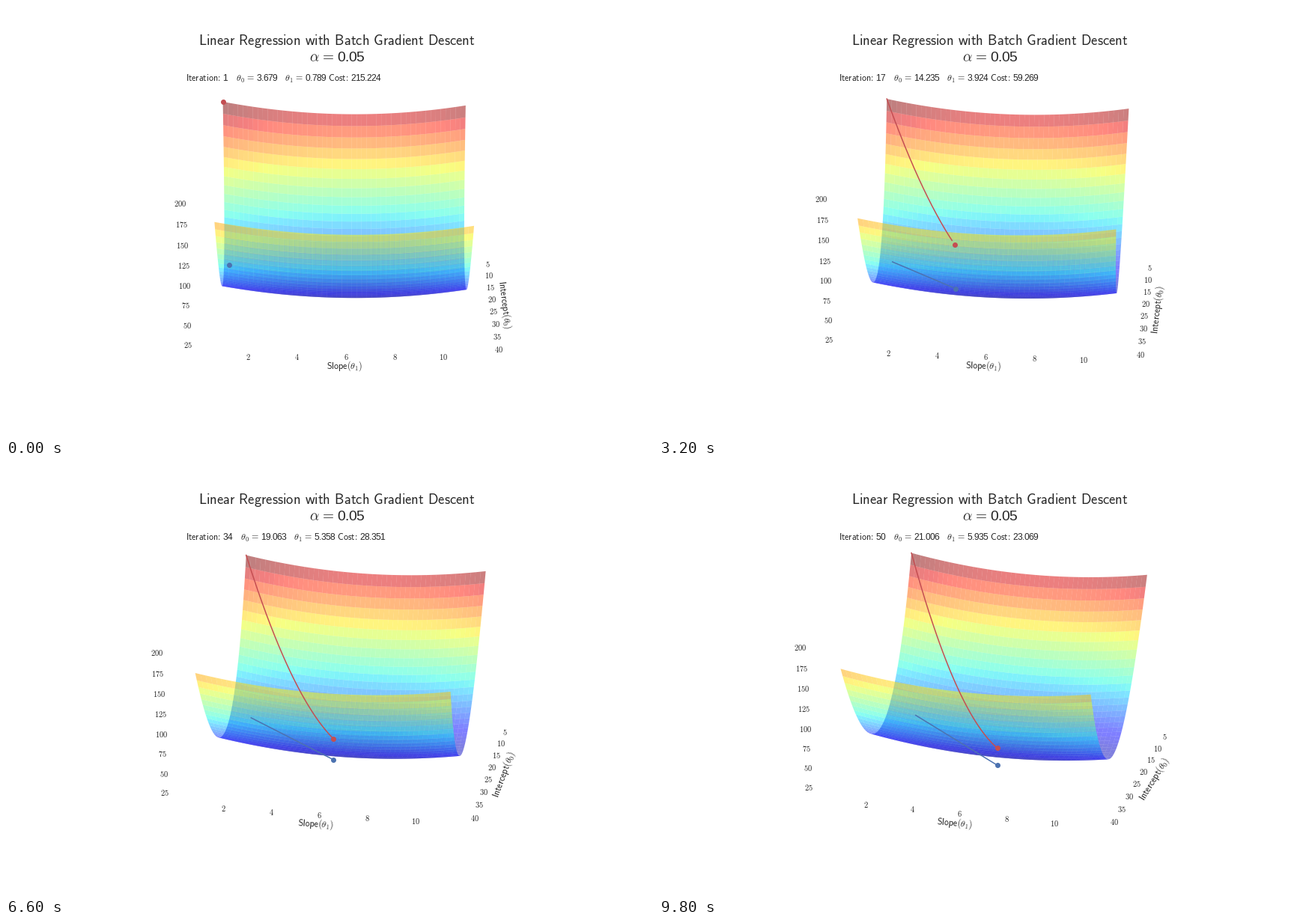
Write a matplotlib script that moves like this. It is 864x576 px and loops after 10000 ms.

```python
import numpy as np
import matplotlib.pyplot as plt
from matplotlib.animation import FuncAnimation
from matplotlib.collections import PolyCollection

plt.rcParams["mathtext.fontset"] = "cm"
plt.rcParams["font.family"] = "Liberation Sans"

W, H = 864, 576
STEPS = 50
INK, RED, BLUE = "#262626", "#C44E52", "#4C72B0"

# Gradient descent on a quadratic bowl, alpha = 0.05
BEST = np.array([22.5328, 6.389])
START = BEST - [19.8466, 5.8952]


def cost(t0, t1):
    return 21.8002 + ((t0 - BEST[0]) ** 2 + (t1 - BEST[1]) ** 2) / 2


decay = 0.95 ** np.arange(1, STEPS + 1)
T0, T1 = (b + (s - b) * decay for b, s in zip(BEST, START))
COST = cost(T0, T1)
END0, END1 = 38.42, 2 * T1[-1] - T1[0]

# Centre and length of each axis of the unit cube
MID = np.array([(T0[0] + END0) / 2, (T1[0] + END1) / 2, 114.9])
SPAN = np.array([1.1 * (END0 - T0[0]), 1.1 * (END1 - T1[0]), 198.9])

# Camera
ELEV, DIST, TURN = np.radians(30), 10, 0.3
CX, CY, KX, KY = 451.8, 284.9, 3619, 2397


def project(x, y, z, azim):
    """Cube coordinates to pixels and depth."""
    ca, sa = np.cos(azim), np.sin(azim)
    fwd, side = x * ca + y * sa, y * ca - x * sa
    depth = DIST - fwd * np.cos(ELEV) - z * np.sin(ELEV)
    up = z * np.cos(ELEV) - fwd * np.sin(ELEV)
    return CX + KX * side / depth, CY - KY * up / depth, depth


def place(t0, t1, z, azim):
    """Data coordinates to pixels and depth."""
    p = [(v - m) / s for v, m, s in zip((t0, t1, z), MID, SPAN)]
    return project(*p, azim)


def quads(a):
    return np.stack([a[:-1, :-1], a[:-1, 1:], a[1:, 1:], a[1:, :-1]], -1).reshape(-1, 4)


G0, G1 = np.meshgrid(np.linspace(T0[0], END0, 50),
                     np.linspace(T1[0], END1, 50), indexing="ij")
GZ = cost(G0, G1)
level = quads(GZ).mean(1)
FACES = plt.cm.jet((level - level.min()) / np.ptp(level))
FACES[:, 3] = 0.5


def gap(em):
    return r"\hspace{%.3f}" % (em / 0.878)


def number(text):
    """Sans digits half an em wide; the math space after a point is undone."""
    marks = {".": r".\hspace{-0.2}"}
    return r"\mathregular{%s}" % "".join(marks.get(c, c + gap(-0.056)) for c in text)


def sans(text):
    words = [number(w) if w[0].isdigit() else r"\mathsf{%s}" % w for w in text.split(" ")]
    colon = r"\hspace{-0.2}:\hspace{-0.2}"
    return gap(0.333).join(words).replace(":", colon)


EQ = gap(0.1) + "=" + gap(0.1)

fig = plt.figure(figsize=(W / 72, H / 72), dpi=72, facecolor="white")
ax = fig.add_axes([0, 0, 1, 1])
ax.set(xlim=(0, W), ylim=(H, 0))
ax.axis("off")


def label(s, x=0, y=0, size=10.5, ha="center", va="center"):
    return ax.text(x, y, "$" + s + "$", size=size, color=INK, ha=ha, va=va)


label(sans("Linear Regression with Batch Gradient Descent"), 441.5, 52, 18.65, va="baseline")
label(r"\alpha" + EQ + sans("0.05"), 442, 74, 19.3, va="baseline")
info = label("", 240.5, 101, 12, "left", "baseline")

surface = ax.add_collection(PolyCollection([], linewidths=0, zorder=1))
trails = [ax.plot([], [], color=c, lw=1.5, zorder=3)[0] for c in (BLUE, RED)]
dots = [ax.plot([], [], "o", color=c, ms=7, mew=0, zorder=4)[0] for c in (BLUE, RED)]

OUT, FAR = 0.562, 0.61
ticks = []
for axis, values in enumerate((range(5, 41, 5), range(2, 11, 2), range(25, 201, 25))):
    for v in values:
        ticks.append((axis, (v - MID[axis]) / SPAN[axis], label(str(v))))
name0 = label(sans("Intercept(") + r"\theta_0" + sans(")"), size=12)
name1 = label(sans("Slope(") + r"\theta_1" + sans(")"), size=12)


def put_name(text, pos, axis, azim):
    x, y, _ = project(*pos, azim)
    ends = []
    for e in (-0.52, 0.52):
        p = np.sign(pos) * 0.52
        p[axis] = e
        ends.append(project(*p, azim)[:2])
    (xa, ya), (xb, yb) = ends
    angle = np.degrees(np.arctan2(ya - yb, xb - xa))
    text.set_position((x, y - 8.3))
    text.set_rotation((angle + 90) % 180 - 90)


def draw(i):
    azim = np.radians(TURN * i)

    gx, gy, depth = place(G0, G1, GZ, azim)
    order = np.argsort(-quads(depth).mean(1))
    surface.set_verts(np.stack([quads(gx), quads(gy)], -1)[order])
    surface.set_facecolor(FACES[order])

    for z, trail, dot in zip((COST * 0, COST), trails, dots):
        px, py, _ = place(T0, T1, z, azim)
        trail.set_data(px[:i], py[:i])
        dot.set_data(px[i:i + 1], py[i:i + 1])

    for axis, v, text in ticks:
        p, dy = [((0.985 * v, OUT, -OUT), -3.2), ((OUT, v, -OUT), -4),
                 ((OUT, -OUT, v), 2.2)][axis]
        x, y, _ = project(*p, azim)
        text.set_position((x, y + dy))
    put_name(name0, np.array([0, FAR, -FAR]), 0, azim)
    put_name(name1, np.array([FAR, 0, -FAR]), 1, azim)

    info.set_text("$" + sans(f"Iteration: {i + 1}") + gap(1)
                  + r"\theta_0" + EQ + sans(f"{T0[i]:.3f}") + gap(0.95)
                  + r"\theta_1" + EQ + sans(f"{T1[i]:.3f} Cost: {COST[i]:.3f}") + "$")
    return [surface, info, *trails, *dots, name0, name1]


anim = FuncAnimation(fig, draw, frames=STEPS, interval=200, repeat=True, repeat_delay=0)
plt.show()
```
